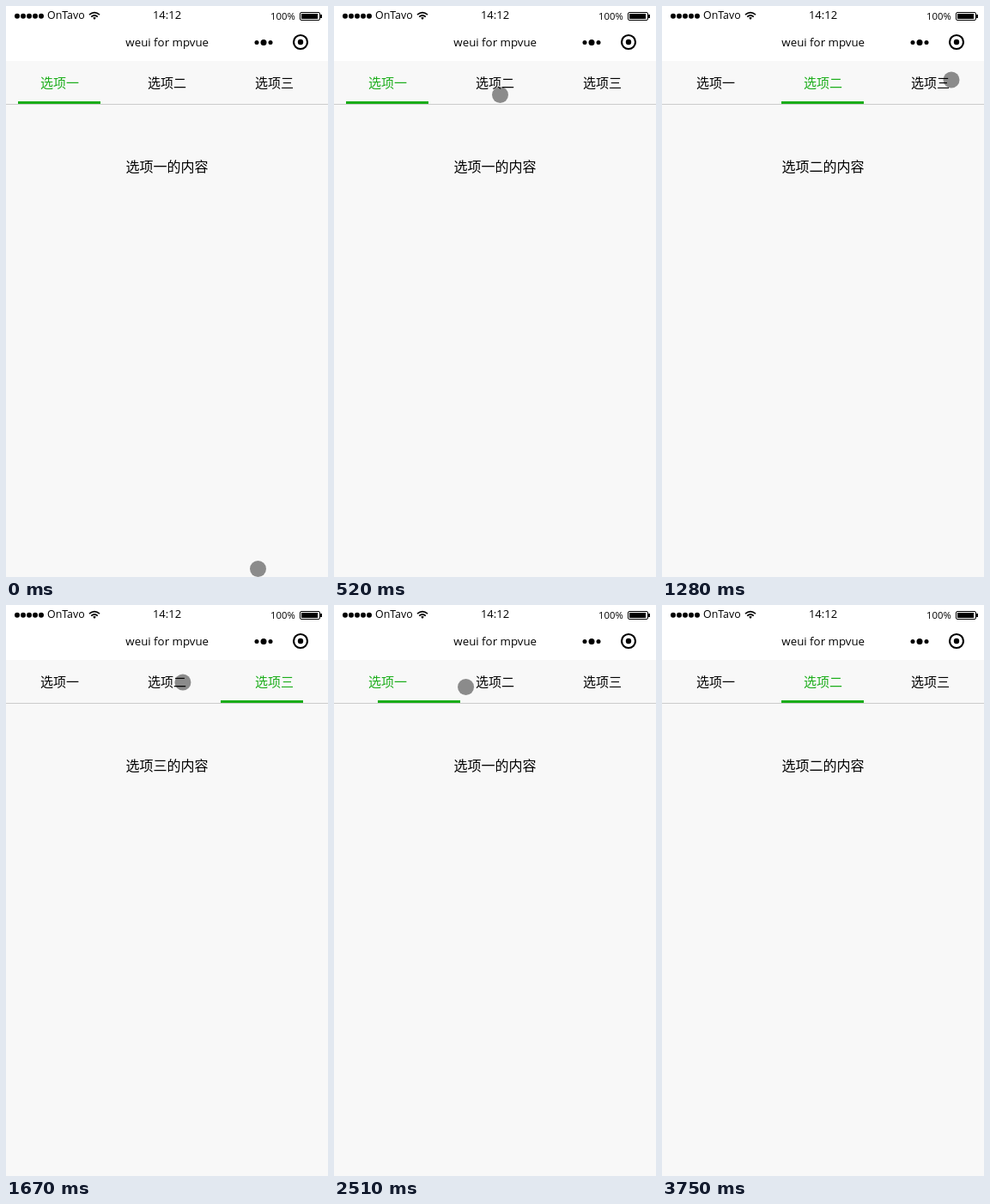
An HTML page for the animation above (4.15 s loop, 375 px wide and 665 px high).

```html
<!DOCTYPE html>
<html lang="zh-CN">
<head>
<meta charset="utf-8">
<style>
html, body { margin: 0; width: 100%; height: 100%; overflow: hidden; background: #f8f8f8; }
svg { display: block; }
text { font-family: "Open Sans", "Noto Sans", sans-serif; }
.mid { text-anchor: middle; }
.tab, #content { font: 350 15px "Noto Sans CJK SC", "Noto Sans CJK", sans-serif; }
#content { font-size: 16px; }
</style>
</head>
<body>
<svg width="375" height="665" viewBox="0 0 375 665">
  <rect width="375" height="64" fill="#fff"/>
  <!-- status bar -->
  <path d="M13 11.7h29" stroke="#000" stroke-width="6" stroke-linecap="round" stroke-dasharray="0 7"/>
  <text x="48" y="15" font-size="12.4">OnTavo</text>
  <path d="M97 10.2q6-5 12 0M99.2 12.6q3.8-3.2 7.6 0" fill="none" stroke="#000" stroke-width="1.7"/>
  <path d="M101.2 13.8q1.8-1.4 3.6 0L103 16z"/>
  <text class="mid" x="187.5" y="15" font-size="13">14:12</text>
  <text x="308" y="16" font-size="11.3">100%</text>
  <rect x="342.5" y="7.5" width="23" height="9" rx="1.5" fill="none" stroke="#000"/>
  <path d="M344 9h19v6h-19zM366 10h2v4h-2z"/>
  <!-- title bar -->
  <text class="mid" x="187.7" y="47" font-size="13.3">weui for mpvue</text>
  <circle cx="292" cy="42.5" r="2.5"/>
  <circle cx="300" cy="42.5" r="3.5"/>
  <circle cx="308" cy="42.5" r="2.5"/>
  <circle cx="343" cy="42" r="8" fill="none" stroke="#000" stroke-width="2.2"/>
  <circle cx="343" cy="42" r="3.2"/>
  <!-- tabs -->
  <path d="M0 114.5h375" stroke="#ccc"/>
  <text class="tab mid" x="62.5" y="95">选项一</text>
  <text class="tab mid" x="187.5" y="95">选项二</text>
  <text class="tab mid" x="312.5" y="95">选项三</text>
  <rect id="bar" y="111" width="96" height="3" fill="#1aad19"/>
  <text class="mid" id="content" x="187.5" y="193"></text>
  <circle id="cursor" r="9.5" fill-opacity=".44"/>
</svg>
<script>
const LOOP = 4150, STEP = 76.3, SLIDE = 300;
const $ = id => document.getElementById(id);
const tabs = document.querySelectorAll('.tab');

// Tab taps: time, tab index
const taps = [[792, 1], [1496, 2], [2351, 0], [3214, 1]];
// Cursor moves: start, end, destination
const moves = [
  [0, 530, 193.5, 103.5],
  [560, 690, 192, 95],
  [763, 1084, 337, 86],
  [1450, 1914, 69, 94],
  [2000, 2140, 63, 96],
  [2290, 2510, 153.5, 95.5],
  [2510, 2820, 179.5, 91.5],
  [3290, 3738, 385, 690],
];

const clamp = p => Math.min(Math.max(p, 0), 1);
const mix = (a, b, p) => a + (b - a) * p;
const smooth = p => p * p * (3 - 2 * p);

// CSS "ease": cubic-bezier(.25, .1, .25, 1), solved by bisection
function ease(p) {
  let s = .5;
  for (let d = .25; d > 1e-5; d /= 2) {
    s += .75 * s * (1 - s) + s ** 3 < p ? d : -d;
  }
  return .3 * s * (1 - s) ** 2 + 3 * s * s * (1 - s) + s ** 3;
}

function draw(now) {
  // The screen refreshes in coarse steps
  const t = Math.floor((now % LOOP + 18) / STEP) * STEP;

  let active = 0, barX = 14;
  for (const [time, tab] of taps) {
    if (t < time) break;
    active = tab;
    barX = mix(barX, 14 + 125 * tab, ease(clamp((t - time) / SLIDE)));
  }
  $('bar').setAttribute('x', Math.round(barX));
  tabs.forEach((tab, n) => tab.setAttribute('fill', n === active ? '#1aad19' : '#000'));
  $('content').textContent = tabs[active].textContent + '的内容';

  let x = 293.5, y = 655.5;
  for (const [start, end, toX, toY] of moves) {
    const p = smooth(clamp((t - start) / (end - start)));
    x = mix(x, toX, p);
    y = mix(y, toY, p);
  }
  $('cursor').setAttribute('cx', x);
  $('cursor').setAttribute('cy', y);
}

const begin = performance.now();
function tick() {
  draw(performance.now() - begin);
  requestAnimationFrame(tick);
}
tick();
</script>
</body>
</html>
```
